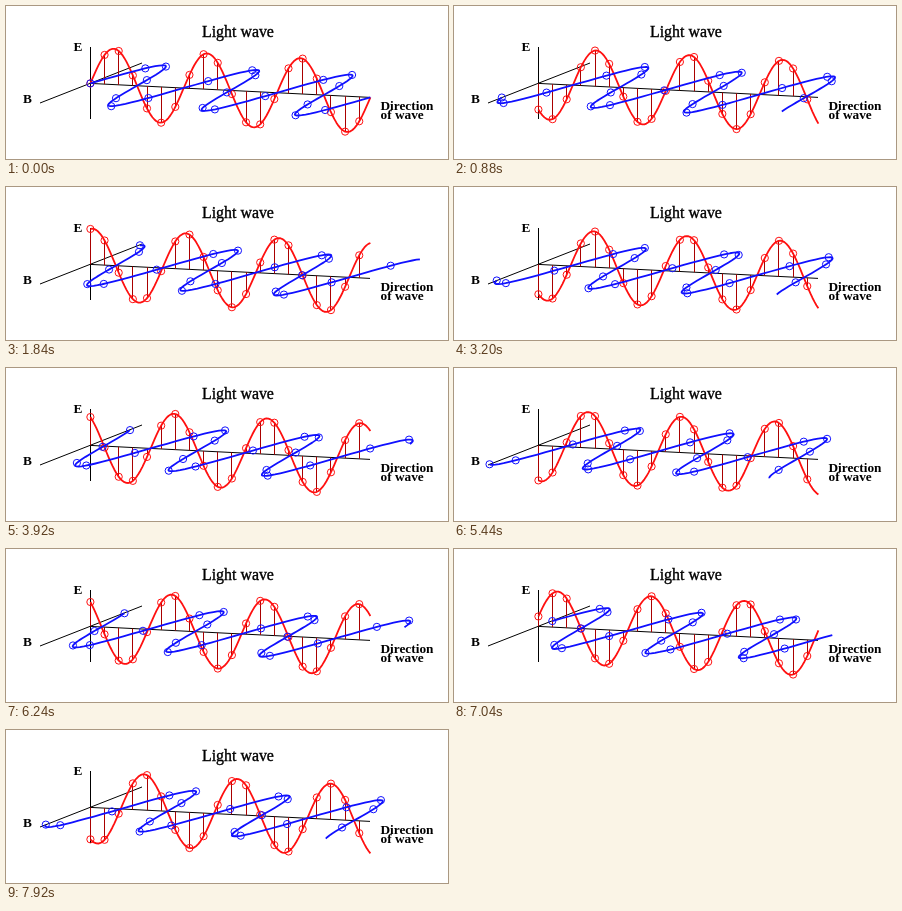
An HTML page for the animation above (8000 ms loop, 442 px wide and 153 px high).

```html
<!DOCTYPE html>
<html lang="en">
<head>
<meta charset="utf-8">
<title>Light wave</title>
<style>
html, body { margin: 0; width: 100%; height: 100%; overflow: hidden; background: #fff; }
svg { display: block; width: 442px; height: 153px; }
text { font: bold 13.3px "Liberation Serif", "Times New Roman", serif; }
.title { font-weight: normal; font-size: 15.9px; stroke: #000; stroke-width: .35px; }
path { fill: none; }
.thin { stroke: #000; stroke-width: 1; }
.stem { stroke: #a00; stroke-width: 1; }
.e { stroke: #ff1010; }
.b { stroke: #1010ff; }
.curve { stroke-width: 1.8; stroke-linejoin: round; }
</style>
</head>
<body>
<svg viewBox="0 0 442 153">
  <text class="title" x="196" y="31">Light wave</text>
  <text x="67.5" y="45">E</text>
  <text x="17" y="97">B</text>
  <text x="374.5" y="104">Direction</text>
  <text x="374.5" y="113">of wave</text>
  <path class="thin" d="M84.5 41V113M34 97L136 57M84 77.4L364 91.4"/>
  <path class="stem" id="stems"/>
  <path class="e curve" id="eCurve"/>
  <path class="e" id="eDots"/>
  <path class="b curve" id="bCurve"/>
  <path class="b" id="bDots"/>
</svg>
<script>
const STEP = 80, STEPS = 100, SPEED = 0.211;
const LENGTH = 280, WAVES = 3, DOTS = 20, GAP = 14.15, R = 3.6;
const set = (id, d) => document.getElementById(id).setAttribute('d', d);

// Both fields at distance u along the axis
function fields(u, phase) {
  const s = Math.sin(2 * Math.PI * WAVES * u / LENGTH + phase);
  const x = 84.4 + u, y = 77.4 + u * 0.05;
  return { x, y, e: [x, y - 35.8 * s], b: [x + 50 * s, y - 19.3 * s] };
}

const fmt = p => p.map(v => v.toFixed(2)).join(' ');
const ring = ([x, y]) =>
  `M${fmt([x - R, y])}a${R} ${R} 0 1 0 ${2 * R} 0a${R} ${R} 0 1 0 ${-2 * R} 0`;

function draw(step) {
  const phase = -SPEED * step;
  const line = [], dots = [];
  for (let u = 0; u <= LENGTH; u += 2) line.push(fields(u, phase));
  for (let i = 0; i < DOTS; i++) dots.push(fields(i * GAP, phase));

  set('stems', dots.map(p => {
    const x = Math.floor(p.x) + 0.5;
    return `M${x} ${p.y.toFixed(2)}V${p.e[1].toFixed(2)}`;
  }).join(''));
  for (const k of ['e', 'b']) {
    set(k + 'Curve', 'M' + line.map(p => fmt(p[k])).join('L'));
    set(k + 'Dots', dots.map(p => ring(p[k])).join(''));
  }
}

let shown = -1;
const start = performance.now();
function tick() {
  const step = Math.floor((performance.now() - start) / STEP) % STEPS;
  if (step !== shown) draw(shown = step);
  requestAnimationFrame(tick);
}
tick();
</script>
</body>
</html>
```
